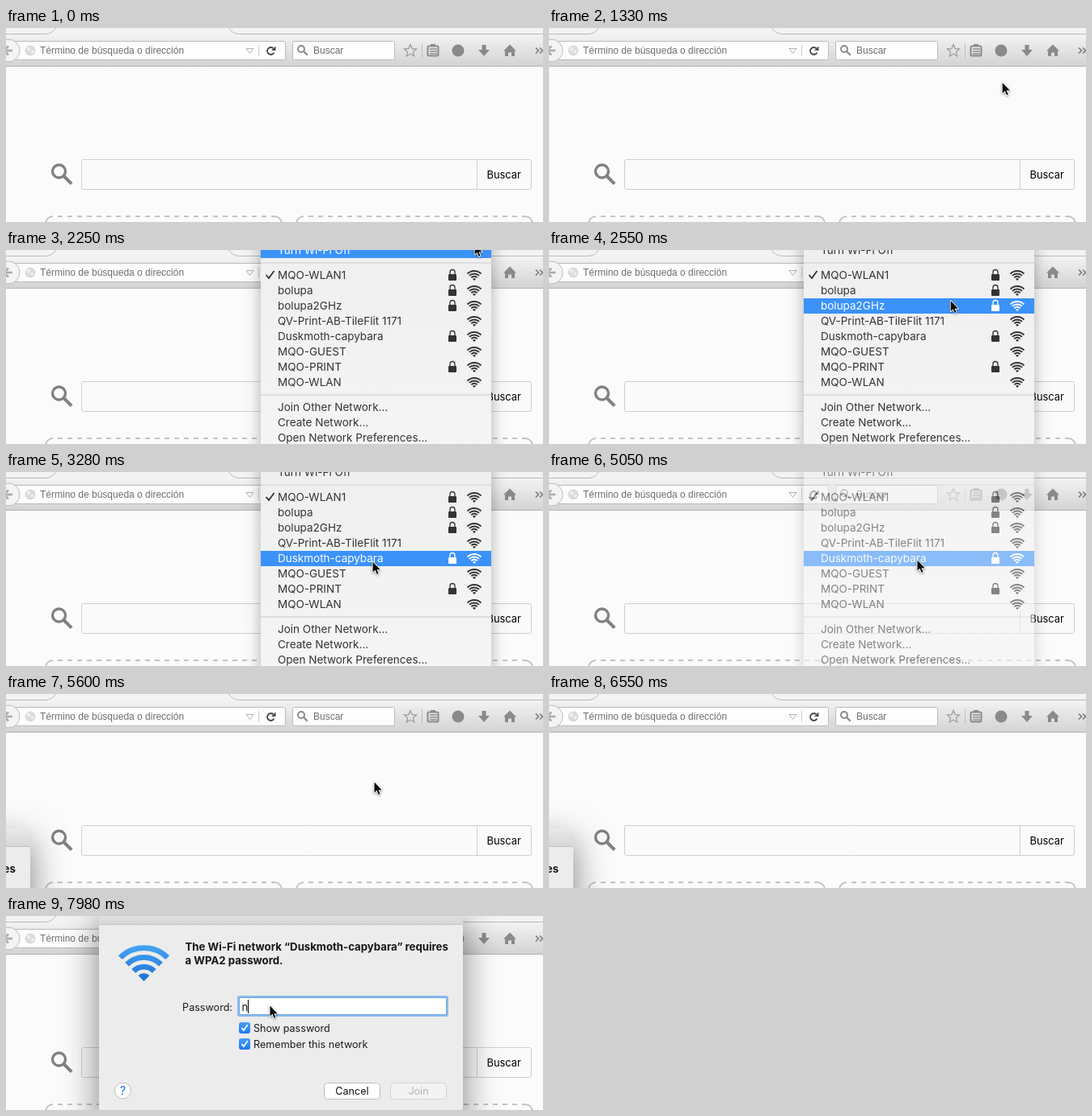
Recreate the animation shown at these times as an HTML page with a canvas. Size 664 by 241 pixels, loop 8000 ms.

```html
<!DOCTYPE html>
<html lang="es">
<head>
<meta charset="utf-8">
<title>Wi-Fi</title>
<style>
html, body { margin: 0; width: 100%; height: 100%; overflow: hidden; background: #fbfbfb; }
canvas { display: block; }
</style>
</head>
<body>
<canvas id="stage" width="664" height="241"></canvas>
<script>
const stage = document.getElementById('stage');
const W = stage.width, H = stage.height, LOOP = 8000;
const layer = Object.assign(document.createElement('canvas'), { width: W, height: H });
const screenCtx = stage.getContext('2d');
let ctx = screenCtx;

const UI = 'Inter, sans-serif';
const LABEL = `12.6px ${UI}`;
const TITLE = `bold 13.2px ${UI}`;
const CHROME = '12px "Liberation Sans", Arial, sans-serif';
const ICON = '#8a8a8a';
const ROW = 19;

const easeOut = u => 1 - (1 - u) ** 2;
const smooth = u => u * u * (3 - 2 * u);

// Cursor legs; bend bows the path vertically.
const LEGS = [
  { start: 500, end: 560, from: [508, 235], to: [517, 225] },
  { start: 830, end: 1630, from: [517, 225], to: [580, -14], bend: 6 },
  { start: 2220, end: 2990, from: [590, -16], to: [451, 112], bend: -10, ease: easeOut },
  { start: 3230, end: 3280, from: [451, 112], to: [453, 110] },
  { start: 4240, end: 4440, from: [453, 110], to: [455, 108] },
  { start: 6070, end: 6550, from: [455, 108], to: [526, 243] },
  { start: 7210, end: 7210, to: [326, 110] }
];

const CONNECTED = 'MQO-WLAN1', CHOSEN = 'Duskmoth-capybara';
const NETWORKS = [CONNECTED, 'bolupa', 'bolupa2GHz', 'QV-Print-AB-TileFlit 1171', CHOSEN,
  'MQO-GUEST', 'MQO-PRINT', 'MQO-WLAN'];
const LOCKED = [CONNECTED, 'bolupa', 'bolupa2GHz', CHOSEN, 'MQO-PRINT'];
const MENU = [
  ['Turn Wi-Fi Off'],
  NETWORKS,
  ['Join Other Network...', 'Create Network...', 'Open Network Preferences...']
];

function paint(fill, stroke, width = 1) {
  if (fill) { ctx.fillStyle = fill; ctx.fill(); }
  if (stroke) { ctx.strokeStyle = stroke; ctx.lineWidth = width; ctx.stroke(); }
}

function rect(x, y, w, h, fill) {
  ctx.fillStyle = fill;
  ctx.fillRect(x, y, w, h);
}

function box(x, y, w, h, r, fill, stroke, width) {
  ctx.beginPath();
  ctx.roundRect(x, y, w, h, r);
  paint(fill, stroke, width);
}

function poly(points, fill) {
  ctx.beginPath();
  points.forEach(p => ctx.lineTo(...p));
  ctx.closePath();
  paint(fill);
}

function polyline(points, color, width = 1) {
  ctx.beginPath();
  points.forEach(p => ctx.lineTo(...p));
  paint(null, color, width);
}

const hline = (x1, x2, y, color, width) => polyline([[x1, y], [x2, y]], color, width);
const vline = (x, y1, y2, color) => polyline([[x, y1], [x, y2]], color);
const tick = (x, y, s, color) =>
  polyline([[x - s, y], [x - s * 0.3, y + s * 0.8], [x + s, y - s]], color, 1.8);
const chevron = (x, y, s, color, width) =>
  polyline([[x, y - Math.abs(s)], [x + s, y], [x, y + Math.abs(s)]], color, width);

function circle(x, y, r, fill, stroke, width) {
  ctx.beginPath();
  ctx.arc(x, y, r, 0, Math.PI * 2);
  paint(fill, stroke, width);
}

function text(str, x, y, font, color, align = 'left') {
  ctx.font = font;
  ctx.fillStyle = color;
  ctx.textAlign = align;
  ctx.fillText(str, x, y);
}

function vertical(y0, y1, top, bottom) {
  const g = ctx.createLinearGradient(0, y0, 0, y1);
  g.addColorStop(0, top);
  g.addColorStop(1, bottom);
  return g;
}

function withShadow(blur, dy, alpha, drawShape) {
  ctx.save();
  ctx.shadowColor = `rgba(0,0,0,${alpha})`;
  ctx.shadowBlur = blur;
  ctx.shadowOffsetY = dy;
  drawShape();
  ctx.restore();
}

function magnifier(x, y, r, color, width) {
  circle(x, y, r, null, color, width);
  polyline([[x + r * 0.75, y + r * 0.75], [x + r * 1.95, y + r * 1.95]], color, width * 1.2);
}

function wifi(x, y, size, color) {
  const from = -Math.PI * 0.75, to = -Math.PI * 0.25;
  for (let i = 1; i <= 3; i++) {
    ctx.beginPath();
    ctx.arc(x, y, size * (0.14 + i * 0.26), from, to);
    paint(null, color, size * 0.15);
  }
  ctx.beginPath();
  ctx.moveTo(x, y);
  ctx.arc(x, y, size * 0.22, from, to);
  paint(color);
}

function lock(x, y, color) {
  box(x - 5, y - 1, 10, 8, 1, color);
  ctx.beginPath();
  ctx.moveTo(x - 3, y);
  ctx.arc(x, y - 3.5, 3, Math.PI, 0);
  ctx.lineTo(x + 3, y);
  paint(null, color, 1.3);
}

function star(x, y, r) {
  ctx.beginPath();
  for (let i = 0; i < 10; i++) {
    const a = i * Math.PI / 5 - Math.PI / 2, d = i % 2 ? r * 0.45 : r;
    ctx.lineTo(x + d * Math.cos(a), y + d * Math.sin(a));
  }
  ctx.closePath();
  paint(null, '#9a9a9a', 1.2);
}

function drawToolbarIcons() {
  star(500, 28.5, 8);
  vline(514.5, 19, 37, '#bdbdbd');

  box(521.5, 22.5, 13, 12, 1.5, null, ICON, 2);
  rect(525, 20, 6, 3, ICON);
  for (let y = 26; y <= 32; y += 3) hline(524, 533, y, ICON, 1.4);

  circle(559, 28, 7.5, ICON);

  rect(588.5, 21, 5, 7, ICON);
  poly([[584, 27], [598, 27], [591, 35]], ICON);

  poly([[615, 28.5], [623, 20.5], [631, 28.5]], ICON);
  rect(617, 28, 4, 7, ICON);
  rect(625, 28, 4, 7, ICON);
  rect(617, 28, 12, 2.5, ICON);

  for (const x of [655, 660]) chevron(x, 28, 3.5, '#7c7c7c', 1.7);
}

function drawToolbar() {
  rect(0, 0, W, 8, '#f3f3f3');
  rect(0, 8, W, 39, vertical(8, 47, '#f3f3f3', '#d3d3d3'));
  hline(0, W, 47.5, '#b4b4b4');

  ctx.beginPath();
  ctx.moveTo(0, 7.5);
  ctx.lineTo(49, 7.5);
  ctx.quadraticCurveTo(58, 7, 62, -1);
  ctx.moveTo(275, -1);
  ctx.quadraticCurveTo(279, 7, 288, 7.5);
  ctx.lineTo(W, 7.5);
  paint(null, '#b9b9b9');

  box(-10.5, 16.5, 356, 23, 2, '#fdfdfd', '#bababa');
  circle(3, 28, 14, '#f4f4f4', '#bcbcbc');
  hline(-2, 8, 28, '#aaaaaa', 2.6);
  chevron(3, 28, -5.5, '#aaaaaa', 2.6);

  circle(30, 28, 6.5, '#d8dadc');
  circle(28, 26, 2.5, '#eceeef');
  circle(32.5, 29.5, 2, '#eceeef');
  text('Término de búsqueda o dirección', 42, 32, CHROME, '#6f6f6f');
  polyline([[297, 25.5], [306, 25.5], [301.5, 31.5], [297, 25.5]], '#b2b2b2');
  vline(312.5, 21, 35, '#cfcfcf');
  ctx.beginPath();
  ctx.arc(327.5, 28.5, 4.4, 0.5, Math.PI * 1.75);
  paint(null, '#4b4b4b', 2);
  poly([[333.5, 22.5], [333.5, 28], [328, 28]], '#4b4b4b');

  box(354.5, 16.5, 126, 23, 2, '#fdfdfd', '#bababa');
  magnifier(365, 26, 4, '#888888', 1.9);
  text('Buscar', 380, 32, CHROME, '#6f6f6f');
  drawToolbarIcons();
}

function drawTile(x) {
  ctx.save();
  for (const [edge, inset] of [[x, 9], [x + 292, -9]]) {
    ctx.beginPath();
    ctx.moveTo(edge, 243);
    ctx.arcTo(edge, 234, edge + inset, 234, 9);
    paint(null, '#c3c3c3', 2);
  }
  ctx.setLineDash([6, 6]);
  hline(x + 15, x + 283, 234, '#c3c3c3', 2);
  ctx.restore();
}

function drawBrowser() {
  rect(0, 0, W, H, '#fbfbfb');
  drawToolbar();
  magnifier(65.5, 178, 8, '#818181', 3.4);
  box(93.5, 163.5, 556, 37, 2, '#fafafa', '#cbd0d3');
  vline(582.5, 164, 200, '#cbd0d3');
  text('Buscar', 594.5, 187, `12.9px ${UI}`, '#000000');
  drawTile(49);
  drawTile(359);
}

function drawMenuRow(label, y, active) {
  const color = active ? '#ffffff' : '#333333';
  if (active) rect(315, y - 9, 285, ROW, '#3b92f9');
  text(label, 336, y + 5, `13.5px ${UI}`, color);
  if (label === CONNECTED) tick(326.5, y, 5, color);
  if (LOCKED.includes(label)) lock(552, y, color);
  if (NETWORKS.includes(label)) wifi(579, y + 7, 13, color);
}

function drawMenu(t, cursorY) {
  withShadow(18, 5, 0.3, () => rect(315, -30, 285, 300, vertical(0, H, '#efefef', '#f5f5f4')));
  const hovering = t >= 2220 && !(t >= 4830 && t < 4890);
  let y = 0;
  MENU.forEach((group, i) => {
    if (i) {
      rect(315, y - 4, 285, 2, '#dedede');
      y += 12;
    }
    for (const label of group) {
      drawMenuRow(label, y, hovering && cursorY >= y - 9 && cursorY < y + 10);
      y += ROW;
    }
  });
}

// The menu fades as one flat layer, so its shadow never shows through.
function compositeMenu(t, cursorY) {
  if (t < 2040 || t >= 5240) return;
  ctx = layer.getContext('2d');
  ctx.clearRect(0, 0, W, H);
  drawMenu(t, cursorY);
  ctx = screenCtx;
  ctx.globalAlpha = Math.min(1, (5240 - t) / 320);
  ctx.drawImage(layer, 0, 0);
  ctx.globalAlpha = 1;
}

function drawCheck(label, y) {
  box(288, y - 7, 14, 14, 3, vertical(y - 7, y + 7, '#4b9df8', '#1f78f2'));
  tick(295, y, 3.7, '#ffffff');
  text(label, 306, y + 4.5, LABEL, '#1c1c1c');
}

function drawButton(label, x, enabled) {
  const [fill, edge, ink] = enabled ? ['#ffffff', '#bdbdbd', '#111111'] : ['#f3f3f3', '#d3d3d3', '#b5b5b5'];
  box(x + 0.5, 207.5, 69, 20, 4, fill, edge);
  text(label, x + 35, 222, LABEL, ink, 'center');
}

function drawPasswordField(t) {
  text('Password:', 280, 118, LABEL, '#1c1c1c', 'right');
  box(286, 99, 261, 26, 3, '#8bbbee');
  box(288.5, 101.5, 256, 21, 0, '#ffffff', '#6ea7e3');
  const typed = t >= 7980;
  if (typed) text('n', 291.5, 118, `13px ${UI}`, '#111111');
  if (typed || (t >= 7270 && t < 7830)) rect(typed ? 299 : 292, 104, 1, 17, '#000000');
}

function drawDialog(dx, dy, t) {
  ctx.save();
  ctx.translate(dx, dy);
  withShadow(44, 16, 0.5, () => box(115, -12, 450, 270, 5, '#ececec'));
  box(115, -12, 450, 23, [5, 5, 0, 0], vertical(-12, 11, '#e9e9e9', '#d6d6d6'));
  hline(115, 565, 10.5, '#c2c2c2');

  wifi(170.5, 81, 45, vertical(36, 82, '#45a6f5', '#1c6fd3'));
  text(`The Wi-Fi network “${CHOSEN}” requires`, 221.5, 43, TITLE, '#161616');
  text('a WPA2 password.', 221.5, 60, TITLE, '#161616');
  drawPasswordField(t);
  drawCheck('Show password', 139);
  drawCheck('Remember this network', 159);

  circle(144.5, 217, 10, '#ffffff', '#bfbfbf');
  text('?', 144.5, 222, `500 14px ${UI}`, '#2c7be0', 'center');
  drawButton('Cancel', 393, true);
  drawButton('Join', 475, false);
  ctx.restore();
}

function cursorAt(t) {
  const leg = LEGS.findLast(l => t >= l.start);
  if (!leg) return [0, H * 2];
  const { start, end, to, from = to, bend = 0, ease = smooth } = leg;
  const u = t >= end ? 1 : ease((t - start) / (end - start));
  const [x, y] = from.map((a, i) => a + (to[i] - a) * u);
  return [x, y + bend * 4 * u * (1 - u)];
}

function drawCursor(x, y) {
  const shape = [[0, 0], [0, 13], [3, 10.3], [5.2, 15.4], [7.1, 14.6], [5, 9.7], [9.2, 9.7]];
  ctx.save();
  ctx.translate(x + 0.5, y + 1.5);
  ctx.lineJoin = 'round';
  withShadow(3, 1, 0.3, () => {
    poly(shape, '#ffffff');
    paint(null, '#ffffff', 1.8);
  });
  poly(shape, '#0a0a0a');
  ctx.restore();
}

function draw(t) {
  const [x, y] = cursorAt(t);
  drawBrowser();
  compositeMenu(t, y);
  if (t >= 7210) drawDialog(0, 0, t);
  else if (t >= 5600) drawDialog(-535, 179, t);
  if (t < 1690 || t >= 2220) drawCursor(x, y);
}

const origin = performance.now();
function loop() {
  draw((performance.now() - origin) % LOOP);
  requestAnimationFrame(loop);
}
loop();
</script>
</body>
</html>
```
